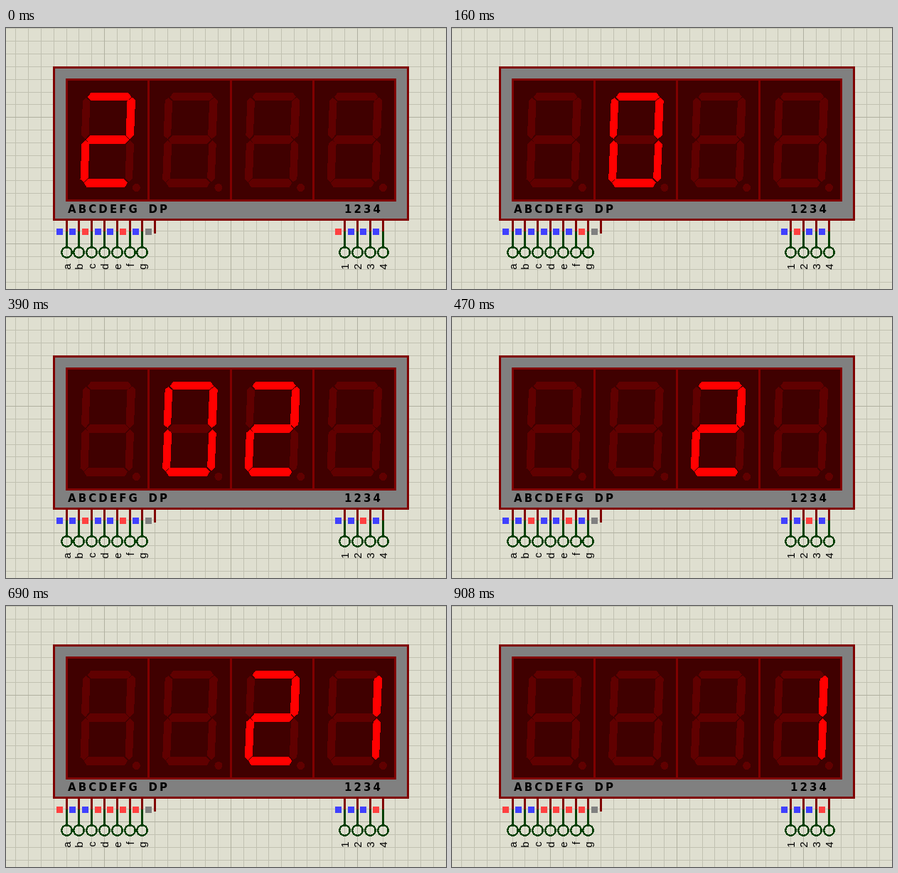
Animation of 619 by 367 pixels, one loop 1000 ms. Source, as an HTML page:

```html
<!DOCTYPE html>
<html lang="en">
<head>
<meta charset="utf-8">
<title>Multiplexed four-digit display</title>
<style>
  html, body { margin: 0; width: 100%; height: 100%; overflow: hidden; background: #dfdfd0; }
  svg { display: block; shape-rendering: crispEdges; }
  .legend { font: bold 15px "DejaVu Sans", sans-serif; letter-spacing: 3.1px; }
  .label { font: 15px "Liberation Sans", Arial, sans-serif; text-anchor: end; }
</style>
</head>
<body>
<svg id="stage" width="619" height="367" viewBox="0 0 619 367"></svg>
<script>
const stage = document.getElementById('stage');
const PITCH = 17.8, DIGIT_PITCH = 115.7, LOOP = 1000, AFTERGLOW = 80;
const DARK_RED = '#800000', GREEN = '#004000';
const HIGH = '#ff4040', LOW = '#4040ff', FLOATING = '#808080';
const LIT = '#ff0000', UNLIT = '#600000';

const SEGMENTS = {
  a: '115,97 119.5,91 172,91 176.5,97 171,102 119.5,102',
  b: '177.5,97.5 182,102 180,151 174,156 168.5,151 170.5,103',
  c: '174.5,158 180,163.5 178,212 173,216.5 167.5,211 169.5,163',
  d: '109.5,217.5 115,212 166,212 171,217.5 167,224 113.5,224',
  e: '112,158 117.5,163 115.5,211 109,217 104.5,212.5 106.5,163',
  f: '112.5,98 118.5,103 116.5,150 111.5,156 106,151 108,102',
  g: '113,157 118.5,151 168,151 173,157 167,163 117,163'
};
const NAMES = Object.keys(SEGMENTS);

// Each digit is switched on at `start` and fades out just after the next one starts.
const SCAN = [
  { start: 0, on: 'abdeg' },
  { start: 80, on: 'abcdef' },
  { start: 390, on: 'abdeg' },
  { start: 690, on: 'bc' }
];

function add(tag, attrs, text) {
  const node = document.createElementNS('http://www.w3.org/2000/svg', tag);
  for (const key in attrs) node.setAttribute(key, attrs[key]);
  if (text) node.textContent = text;
  return stage.appendChild(node);
}

function line(x1, y1, x2, y2, stroke, width) {
  return add('line', { x1, y1, x2, y2, stroke, 'stroke-width': width });
}

function frame(x, y, width, height, fill) {
  add('rect', { x, y, width, height, fill, stroke: DARK_RED, 'stroke-width': 3 });
}

// Pins sit on the vertical grid lines, counted from the first pin.
function gridX(slot) {
  return Math.floor(85.01 + slot * PITCH) + .5;
}

function drawGrid() {
  for (const major of [false, true]) {
    const color = major ? '#b0b0a0' : '#c1c1b1';
    for (let k = -10; k < 35; k++) {
      if ((k % 10 === 0) !== major) continue;
      const x = gridX(k + 3);
      const y = Math.floor(125.6 + k * PITCH) + .5;
      line(x, 0, x, 367, color, 1);
      line(0, y, 619, y, color, 1);
    }
  }
}

function drawPin(slot, name) {
  const x = gridX(slot);
  line(x, 271, x, 289, DARK_RED, 3);
  if (name) {
    line(x, 286, x, 308, GREEN, 3);
    add('circle', { cx: x, cy: 315.5, r: 7.25, fill: 'none', stroke: GREEN, 'stroke-width': 2.5 });
    add('text', { class: 'label', transform: `translate(${x + 5} 331.3) rotate(-90)` }, name);
  }
  return add('rect', {
    x: Math.floor(71.61 + slot * PITCH), y: 282, width: 9, height: 9, fill: FLOATING
  });
}

function drawDigit(index) {
  const transform = `translate(${index * DIGIT_PITCH} 0)`;
  add('circle', { cx: 183.3, cy: 224.5, r: 5.5, fill: UNLIT, transform });
  return NAMES.map(name => add('polygon', { points: SEGMENTS[name], transform }));
}

drawGrid();
frame(67.5, 55.5, 498, 214, '#808080');
frame(85.5, 72.5, 462, 170, '#400000');
for (const x of [200.5, 316.5, 432.5]) line(x, 73, x, 242, DARK_RED, 3);
add('text', { class: 'legend', x: 87, y: 260 }, 'ABCDEFG');
add('text', { class: 'legend', x: 200.5, y: 260 }, 'DP');
add('text', { class: 'legend', x: 476, y: 260 }, '1234');

const digits = SCAN.map((_, i) => drawDigit(i));
const segmentPins = NAMES.map((name, i) => drawPin(i, name));
drawPin(7);
const digitPins = SCAN.map((_, i) => drawPin(22 + i, String(i + 1)));

function render(time) {
  const t = time % LOOP;
  const active = SCAN.filter(step => step.start <= t).length - 1;
  const glowing = t < SCAN[active].start + AFTERGLOW ? active - 1 : -1;

  SCAN.forEach((step, i) => {
    const shown = i === active || i === glowing;
    NAMES.forEach((name, s) =>
      digits[i][s].setAttribute('fill', shown && step.on.includes(name) ? LIT : UNLIT));
    digitPins[i].setAttribute('fill', i === active ? HIGH : LOW);
  });
  // Segment inputs are active low.
  NAMES.forEach((name, s) =>
    segmentPins[s].setAttribute('fill', SCAN[active].on.includes(name) ? LOW : HIGH));
}

const began = performance.now();
function tick() {
  render(performance.now() - began);
  requestAnimationFrame(tick);
}
tick();
</script>
</body>
</html>
```
